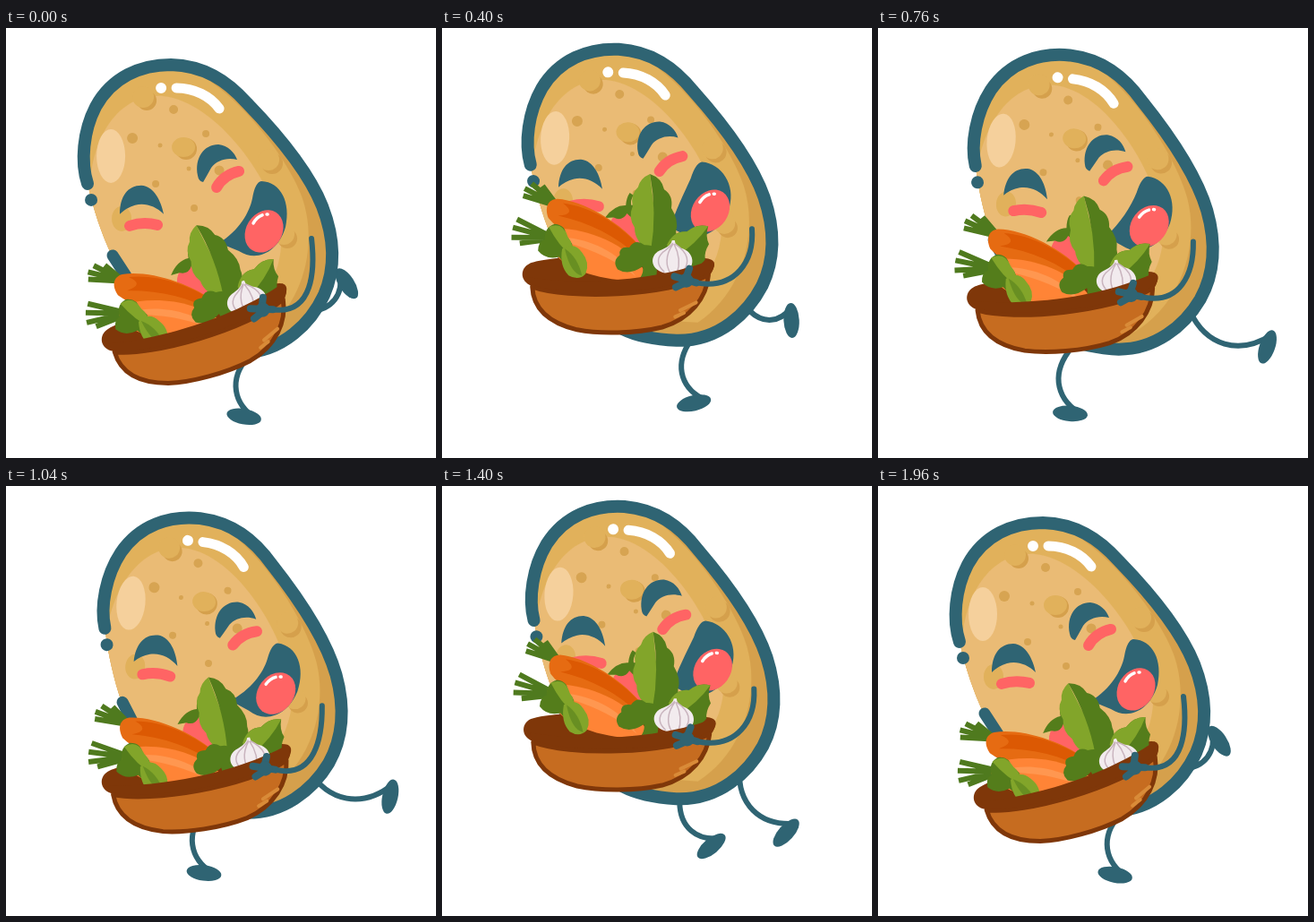
These frames come from a looping animation (480 px wide and 480 px high, 2 s). An HTML page:

```html
<!DOCTYPE html>
<html lang="en">
<head>
<meta charset="utf-8">
<title>Running potato</title>
<style>
  html, body { margin: 0; width: 100%; height: 100%; overflow: hidden; background: #fff; }
  svg { display: block; width: 100%; height: 100%; }
  .line { fill: none; stroke: #2f6473; stroke-linecap: round; stroke-linejoin: round; }
  .limb { stroke-width: 6; }
  .ink { fill: #2f6473; }
  .red { fill: #ff6464; }
  .dark { fill: #547d1b; }
  .lime { fill: #82a52a; }
  .bark { fill: #7f3709; }
  .stem { fill: none; stroke: #4f7a1e; stroke-width: 6; }
  .blush { fill: none; stroke: #ff6464; stroke-width: 12; stroke-linecap: round; }
  .shine { fill: none; stroke: #fff; stroke-linecap: round; }
</style>
</head>
<body>
<svg viewBox="0 0 480 480">
  <defs>
    <clipPath id="skin">
      <path d="M91 174C83 150 86 115 100 88C118 55 150 41 184 41C220 42 246 58 269 84C302 118 337 159 353 199C367 235 368 268 355 298C341 328 310 362 262 363C200 362 146 318 117 252C107 230 98 205 91 174Z"/>
    </clipPath>
  </defs>

  <g>
    <path id="backLimb" class="line limb"/>
    <ellipse id="backFoot" class="ink" rx="19.5" ry="8.7"/>
    <path id="frontLimb" class="line limb"/>
    <ellipse id="frontFoot" class="ink" rx="19.5" ry="8.7"/>
  </g>

  <g id="body">
    <g clip-path="url(#skin)">
      <rect x="70" y="30" width="310" height="345" fill="#d5a04c"/>
      <path fill="#e1b15b" d="M80 190C75 60 150 30 200 45C250 62 312 140 330 188C348 238 335 305 285 342L150 340Z"/>
      <path fill="#eabb75" d="M92 205C90 122 125 73 175 76C235 82 300 172 307 230C310 280 280 320 230 330L120 310Z"/>
      <g fill="#d5a04c">
        <circle cx="157" cy="81" r="11"/><circle cx="201" cy="135" r="12"/>
        <circle cx="297" cy="151" r="12"/><circle cx="314" cy="235" r="11"/>
      </g>
      <g fill="#e1b15b">
        <circle cx="153" cy="77" r="12"/><ellipse cx="198" cy="133" rx="13" ry="11"/>
        <circle cx="293" cy="147" r="12"/><circle cx="310" cy="230" r="12"/>
        <ellipse cx="129" cy="213" rx="11" ry="14"/>
      </g>
      <g fill="#d7a452">
        <circle cx="187" cy="91" r="5"/><circle cx="141" cy="123" r="6"/>
        <circle cx="172" cy="131" r="2.500"/><circle cx="223" cy="118" r="4"/>
        <circle cx="167" cy="174" r="4"/><circle cx="204" cy="157" r="2.500"/>
        <circle cx="210" cy="201" r="4"/><circle cx="238" cy="159" r="5.500"/>
      </g>
      <ellipse cx="117" cy="143" rx="16" ry="30" fill="#f5d09c"/>
    </g>
    <path class="line" stroke-width="14" d="M91 174C83 150 86 115 100 88C118 55 150 41 184 41C220 42 246 58 269 84C302 118 337 159 353 199C367 235 368 268 355 298C341 328 310 362 262 363C240 363 220 361 202 353"/>
    <circle class="ink" cx="95" cy="192" r="7"/>
    <circle cx="173" cy="67" r="6" fill="#fff"/>
    <path class="shine" stroke-width="11" d="M190 67C210 67 228 76 238 90"/>

    <g id="eyes" class="ink">
      <path d="M127 208C127 188 136 176 151 176C165 177 173 193 176 208C167 199 155 195 144 198Q134 201 127 208Z"/>
      <path d="M214 165C210 145 221 130 237 130C248 131 255 139 258 147C246 144 235 148 229 156Q223 167 220 172Q215 171 214 165Z"/>
    </g>
    <g id="blushes">
      <path class="blush" d="M138 220Q153 215 169 219"/>
      <path class="blush" stroke-width="11" d="M235 177Q243 163 260 159"/>
    </g>
    <path id="mouth" class="ink"/>
    <g id="tongue">
      <ellipse class="red" cx="288" cy="227" rx="20" ry="25" transform="rotate(32 288 227)"/>
      <path class="shine" stroke-width="3.500" d="M276 218Q280 211 286 209M291 208L292 208"/>
    </g>
    <path class="line" stroke-width="13" d="M119 254L134 277"/>

    <g id="bowl">
      <path class="bark" d="M100 258C122 249 275 249 296 260Q312 262 303 275C290 294 150 304 105 284C88 280 88 263 100 258Z"/>
      <g id="greens">
        <ellipse class="red" cx="214" cy="223" rx="24" ry="21"/>
        <path class="dark" d="M186 210Q197 196 210 197Q211 188 215 183L219 186Q215 192 216 197Q228 196 234 204L222 204L229 216Q217 214 211 206Q205 215 196 210Z"/>
      </g>

      <g id="carrots">
        <path class="stem" d="M131 193L96 181M131 192L98 173M131 191L106 168M131 190L118 171"/>
        <path fill="#e66b12" d="M134 186C162 189 205 215 228 248L216 263C188 250 145 236 123 207C119 194 124 186 134 186Z"/>
        <path fill="#dc5903" d="M140 191C170 196 204 217 228 248L222 255C198 230 168 214 134 205Q156 204 140 191Z"/>
        <path class="stem" d="M122 226L88 207M122 228L83 216M122 229L81 227M122 231L90 234"/>
        <path fill="#ff8436" d="M124 219C162 218 208 238 228 270L222 281C184 280 145 270 122 241Q114 228 124 219Z"/>
        <path fill="#ff9750" d="M145 230C175 235 203 252 218 276Q188 250 145 236Z"/>
      </g>

      <g id="leaves">
        <g id="lettuce">
          <path class="lime" d="M239 163Q228 167 225 177Q216 184 218 198Q212 210 219 222Q218 238 236 251L245 249L242 205Z"/>
          <path class="dark" d="M239 163Q252 168 254 181Q264 188 261 202Q269 216 265 228Q266 242 247 251L236 248Q245 206 239 163Z"/>
        </g>
        <path class="dark" d="M254 243Q262 227 277 229Q288 220 301 224Q297 235 301 244Q295 253 296 261Q287 273 264 271Z"/>
        <path class="lime" d="M254 243Q262 227 277 229Q288 220 301 224Q287 243 263 257Z"/>
        <path class="dark" d="M198 268Q192 258 201 252Q200 242 212 244Q219 234 229 242Q244 242 244 255L240 284L214 286Q228 277 226 266Q210 276 198 268Z"/>
        <path fill="#f2ebee" d="M263 238Q263 245 272 248C286 254 285 273 268 276Q258 278 250 274C233 269 234 252 248 248Q259 244 260 238Z"/>
        <path fill="none" stroke="#c9b4be" stroke-width="1.500" d="M261 241Q254 248 249 251C240 259 244 267 250 273M261 242C251 255 252 267 257 275M262 242C268 255 268 265 264 275M263 242C278 253 279 263 271 273"/>
      </g>

      <g id="spinach">
        <path class="dark" d="M110 243Q111 232 118 231Q118 217 130 214Q143 216 142 229Q151 235 148 247L153 263Q140 262 133 251Q118 254 110 243Z"/>
        <path class="lime" d="M123 217Q139 211 144 229Q151 238 147 250Q134 240 123 217Z"/>
        <path class="lime" d="M137 242Q151 234 159 247Q168 259 162 271Q154 279 143 272Q133 261 137 242Z"/>
        <path class="dark" d="M140 242Q154 252 158 273Q145 270 140 242Z" opacity=".55"/>
      </g>

      <path class="bark" d="M98 273C140 282 230 287 303 262Q309 270 299 281C252 303 140 303 102 285Z"/>
      <path fill="#c66c20" stroke="#7f3709" stroke-width="5" stroke-linejoin="round" d="M102 284C140 300 252 301 299 279C296 304 277 327 245 335C215 341 175 340 150 334C119 325 102 309 102 284Z"/>
      <path fill="none" stroke="#d98b38" stroke-width="4" stroke-linecap="round" d="M260 324L270 320M266 317L284 309"/>
      <path class="line" stroke-width="8" d="M285 287L273 283L278 271M273 283L261 279M274 286L262 291"/>
      <circle class="ink" cx="274" cy="284" r="8"/>
    </g>
    <path id="arm" class="line limb"/>
  </g>
</svg>

<script>
const LOOP = 2000, FRAME = 40, DEGREE = Math.PI / 180;
const { sin, cos } = Math;
const $ = id => document.getElementById(id);
const setPath = (id, d) => $(id).setAttribute("d", d);
const setTransform = (id, value) => $(id).setAttribute("transform", value);
const shift = (id, x, y) => setTransform(id, `translate(${x} ${y})`);

// The limb runs from hip to heel, bowed sideways in proportion to its length
function drawLeg(name, hipX, hipY, footX, footY, angle) {
  const dx = footX + 14 * cos(angle * DEGREE) - hipX;
  const dy = footY + 14 * sin(angle * DEGREE) - hipY;
  const along = (u, bow) => `${hipX + u * dx - bow * dy} ${hipY + u * dy + bow * dx}`;
  setPath(name + "Limb", `M${along(0, 0)}C${along(0.3, 0.34)} ${along(0.7, 0.34)} ${along(1, 0)}`);
  setTransform(name + "Foot", `translate(${footX} ${footY}) rotate(${angle})`);
}

function drawLegs(phase, bob) {
  const c1 = cos(phase), c2 = cos(2 * phase), c3 = cos(3 * phase);
  const skew = sin(phase) - 0.73 * sin(2 * phase);

  const frontY = 423 + 2 * c1 + 12 * c2 - 3 * c3 + 6 * skew;
  drawLeg("front", 255 + 34 * c1 - 14 * c2 - 6 * c3 - 8 * skew, 368 - 16 * bob,
    263 + 27 * c1 - 25 * c2 - 17 * skew, frontY, 1.6 * (frontY - 427));

  const backY = 334 - 42 * c1 - 22 * c2 + 15 * c3 - 10 * skew;
  drawLeg("back", 340 + 6 * skew, 316,
    398.5 - 27 * c1 + 9 * c2 + 10 * skew, backY, 0.74 * (backY - 334) - 87);
}

// Lips part sideways on landing and lift with the tongue at the top of a hop
function drawMouth(b) {
  const point = (x, y, moveX, moveY) => `${x + moveX * b} ${y + moveY * b}`;
  const top = point(285, 171, -3, -9);
  setPath("mouth",
    `M${top}C${point(307, 172, -3, -9)} ${point(318, 195, 3, -9)} ${point(312, 222, 3, -11)}` +
    `C${point(304, 250, 3, -11)} ${point(280, 262, 4, -11)} ${point(260, 249, 6, -5)}` +
    `L${point(238, 240, 13, -3)}C${point(260, 226, -6, -8)} ${point(272, 206, -9, -8)} ` +
    `${point(275, 190, -5, -9)}Q${point(278, 172, -3, -9)} ${top}Z`);
}

function drawBowl(bob) {
  const lift = bob ** 0.6, drop = 1 - bob;
  const x = 211 - 17.5 * lift, y = 322 - 36.5 * lift, tilt = 12 * bob - 16;
  setTransform("bowl", `translate(${x} ${y}) rotate(${tilt}) translate(-199 -269)`);
  for (const id of ["greens", "leaves"]) shift(id, 0, 9 * drop);
  for (const id of ["carrots", "spinach"]) shift(id, 0, 17 * drop);
  setTransform("lettuce", `rotate(${-7 * drop} 243 250)`);

  const c = cos(tilt * DEGREE), s = sin(tilt * DEGREE);
  const wristX = x + 86 * c - 18 * s, wristY = y + 86 * s + 18 * c;
  setPath("arm", `M341 235C345 270 ${wristX + 45} ${wristY + 6} ${wristX} ${wristY}`);
}

function draw(time) {
  const phase = (time + 20) / LOOP * 2 * Math.PI;
  const bob = (1 - cos(2 * phase)) / 2;
  const lean = 3 * (1 - cos(phase + 0.06));
  setTransform("body", `translate(0 ${-16 * bob}) rotate(${lean} 242 355)`);
  shift("eyes", -4 * bob, -11 * bob);
  shift("blushes", 0, 1 - 3 * bob);
  shift("tongue", 6 * bob, -11 * bob);
  drawMouth(bob);
  drawBowl(bob);
  drawLegs(phase, bob);
}

const start = performance.now();
function tick() {
  const elapsed = Math.max(0, performance.now() - start);
  draw(Math.floor(elapsed / FRAME) * FRAME % LOOP);
  requestAnimationFrame(tick);
}
tick();
</script>
</body>
</html>
```
